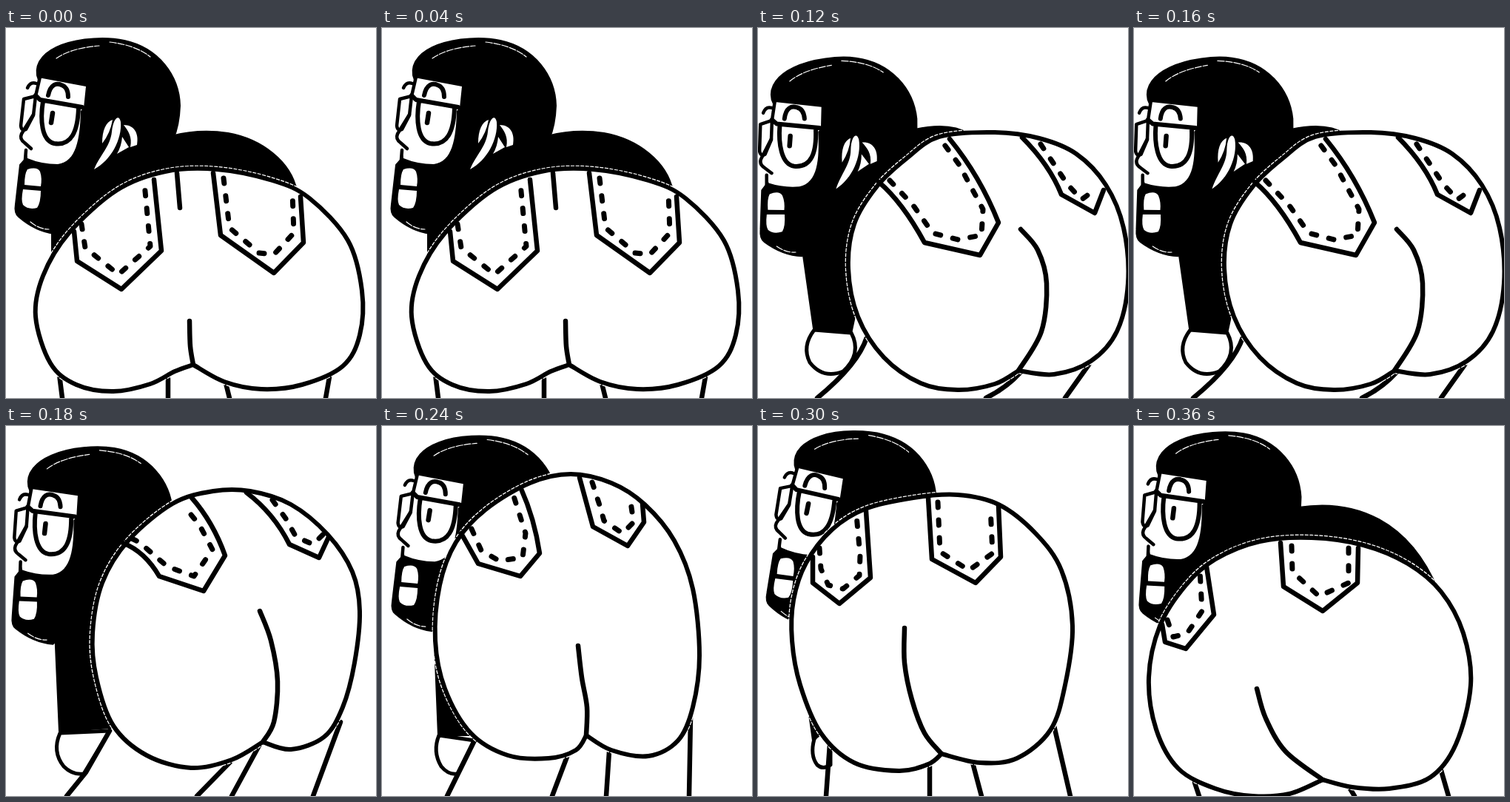
Write an HTML page that moves like this. It is 500 px wide and 500 px high and loops after 420 ms.

```html
<!DOCTYPE html>
<html lang="en">
<head>
<meta charset="utf-8">
<title>Wiggle</title>
<style>
html, body { margin: 0; width: 100%; height: 100%; overflow: hidden; background: #fff; }
svg { display: block; width: 100vw; height: 100vh; }
path { fill: none; stroke: #000; stroke-width: 6; stroke-linecap: round; stroke-linejoin: round; }
.ink { fill: #000; stroke-width: 2; }
.skin { fill: #fff; stroke-width: 5; }
.gap { fill: #fff; stroke: none; }
.thin { stroke-width: 4.5; }
.shine { stroke: #fff; stroke-width: 1.2; stroke-dasharray: 9 2; }
.halo { stroke: #fff; stroke-width: 8.4; stroke-dasharray: 5 1.5; stroke-linecap: butt; }
.body { fill: #fff; }
.line { stroke-width: 6.5; }
.stitch { stroke-width: 7; stroke-dasharray: 7 17; }
.pose { visibility: hidden; animation: show 420ms step-end infinite; }
@keyframes show {
  0% { visibility: visible; }
  14.2857%, 100% { visibility: hidden; }
}
</style>
</head>
<body>
<svg id="stage" viewBox="0 0 500 500">
  <defs>
    <g id="head">
      <path class="ink" d="M42 64C39 45 54 31 75 23C100 13 138 12 160 17C206 27 234 64 235 105Q234 132 226 150L150 205L66 278Q40 275 17 255Q11 250 13 238L19 185L27 176L60 120Z"/>
      <path class="gap" d="M44 67L108 79L105 108L101 112C100 150 95 181 70 184Q48 184 29 176L27 165L33 162L20 149L35 119L40 88Z"/>
      <path class="thin" d="M46 66L40 92M37 117L21 143Q18 150 25 155L34 163M27 165L26 178"/>
      <path class="thin" d="M29 81Q33 72 41 75"/>
      <path d="M57 91C60 76 68 74 75 77Q84 80 84 93"/>
      <path d="M40 91L46 97L103 107M50 99C46 124 48 152 65 156C88 160 97 140 98 108"/>
      <path class="thin" d="M24 96L20 132Q21 140 27 137L37 118L40 92Q32 94 24 96Z"/>
      <path class="line" d="M63 115L61 128"/>
      <path class="gap" d="M29 191Q42 187 46 194Q49 203 47 214L25 212Q25 197 29 191ZM23 218L47 220Q47 236 42 243Q30 246 23 239Q20 233 23 218Z"/>
      <path class="shine" d="M68 41Q88 27 126 24M140 19Q175 23 195 39M33 262Q45 272 58 272"/>
    </g>
    <g id="ear">
      <path class="gap" d="M130 156C130 138 135 127 144 124Q141 142 130 156ZM119 191C128 170 141 160 143 140C145 121 153 116 155 127C157 150 142 179 119 191ZM159 131C173 131 180 142 177 158L168 161C171 147 165 139 159 131ZM157 147L166 161L150 170Q156 160 157 147Z"/>
    </g>
  </defs>
</svg>
<script>
// head: x, y, tilt. body: closed curve starting and ending at the cleft.
const poses = [
  {
    head: [41, 55, 0], ear: true,
    torso: "M62 310V270L140 180L180 163C220 142 260 136 300 142C345 150 385 180 393 220L300 260L100 280Z",
    legs: "M72 468L76 500M219 474V500M297 480L302 500M438 466L432 500",
    body: "253,455 295,478 345,488 400,482 455,457 478,415 481,355 462,287 410,230 360,206 285,191 215,194 150,219 85,277 50,335 40,390 60,453 95,482 145,491 195,481 228,464 253,455",
    cleft: "248,396 249,430 253,455",
    pockets: "M92 275L96 315L156 353L210 301L200 205M280 196L290 280L362 331L402 290L398 228M231 196L235 243",
    stitch: "M102 265L107 297L152 333L195 295L187 210M294 203L302 270L342 304L362 306L389 277L387 222"
  },
  {
    head: [26, 78, -2.4], ear: true,
    torso: "M65 285L76 405H100L200 250L374 188C350 160 300 141 260 143L215 148L150 190Z",
    hand: "M77 406Q62 425 75 437Q92 448 107 440L100 405Z",
    legs: "M107 445L80 500M438 475L415 500",
    body: "330,470 370,487 420,483 465,453 488,380 480,310 455,250 405,205 355,182 300,177 240,187 180,215 130,262 102,318 95,380 107,440 145,495 200,512 260,508 305,491 330,470",
    cleft: "305,282 335,310 354,360 353,420 330,470",
    pockets: "M147 253Q180 258 205 295L269 305L281 250L247 190M318 180Q358 205 378 243L436 283L450 250",
    stitch: "M150 244L168 247L210 281L255 288L264 248L249 208M347 184L373 213L390 239L428 253L440 247"
  },
  {
    head: [17, 88, -4.5], ear: true,
    torso: "M60 300L75 406L126 413L150 300L285 143C265 130 235 132 212 137L150 180Z",
    hand: "M76 408Q59 430 70 452Q88 475 115 464Q141 440 126 412Z",
    legs: "M147 418Q135 455 80 500M355 465Q335 487 308 500M447 455L415 500",
    body: "352,463 400,468 450,450 485,410 500,345 494,270 470,212 430,170 380,149 320,141 245,147 200,177 160,215 130,265 122,325 135,390 170,445 220,480 270,489 320,481 352,463",
    cleft: "355,272 378,300 390,345 383,410 352,463",
    pockets: "M163 208Q195 235 225 290L300 307L325 263Q300 200 259 150M357 148Q394 185 410 225L455 250L467 219",
    stitch: "M178 206L210 240L236 277L270 286L302 280L304 245L272 185L250 155M382 157L402 187L418 211L437 232L456 218"
  },
  {
    head: [29, 73, -2.4],
    torso: "M66 275L72 413L142 408L200 200L200 110L120 140Z",
    hand: "M73 415Q62 440 78 460Q90 472 105 470L140 412Z",
    legs: "M140 412L108 468L82 500M305 452L258 500M342 432L305 500M452 400L415 500",
    body: "347,427 385,437 430,420 455,380 471,320 478,250 468,197 435,147 385,106 330,88 280,88 225,105 165,155 130,212 117,280 122,340 145,405 190,445 250,462 305,451 347,427",
    cleft: "343,250 358,290 367,345 362,400 347,427",
    pockets: "M158 158Q188 170 207 203L267 223L296 175Q280 130 251 97M325 90Q362 118 383 160L423 178L436 150",
    stitch: "M170 152L180 157L218 190L254 203L279 167L261 133L240 108M360 100L378 125L392 150L415 160L430 145"
  },
  {
    head: [43, 54, .3],
    torso: "M70 270L76 418H125L200 250L115 190Z",
    hand: "M77 418Q68 440 80 460Q90 472 102 470L125 425Z",
    legs: "M125 425L88 500M250 447L230 500M307 440L303 500M417 395L415 500",
    body: "276,418 310,438 360,446 400,425 420,380 429,310 420,220 395,155 355,106 310,77 255,65 200,77 140,113 100,157 78,215 72,290 85,355 120,415 170,445 225,449 262,438 276,418",
    cleft: "265,297 270,340 277,380 276,418",
    pockets: "M107 145L130 186L187 203L213 172Q206 125 188 85M267 70L285 136L332 162L354 130L352 105",
    stitch: "M121 139L134 168L158 182L190 178L194 145L178 95M284 76L295 110L300 128L325 145L340 130L336 103"
  },
  {
    head: [49, 44, 2.7],
    torso: "M68 382L74 425H95L100 380Z",
    hand: "M76 423Q70 445 80 458Q88 465 98 458V425Q85 410 76 423Z",
    legs: "M97 430L92 500M232 460V500M290 455L302 500M400 405L422 500",
    body: "248,443 300,455 350,449 395,411 415,350 425,270 410,195 375,145 325,106 270,93 210,97 145,112 100,140 65,185 48,235 46,290 57,350 85,415 130,455 190,466 230,457 248,443",
    cleft: "198,273 198,320 208,370 225,415 248,443",
    pockets: "M74 177V212L110 240L152 205L146 115M230 97L235 180L294 212L328 177L325 108",
    stitch: "M83 165L85 193L95 215L115 220L137 202L138 175L133 120M243 103L246 170L285 195L317 172L314 110"
  },
  {
    head: [30, 52, -1.8],
    torso: "M100 180L130 120L222 110C300 98 372 128 411 222L300 250L50 250Z",
    legs: "M82 482L88 500M290 487L298 500M412 455L425 500",
    body: "255,478 295,488 345,490 400,475 435,430 455,350 445,280 415,224 370,186 310,161 240,151 170,156 110,180 70,215 35,270 20,340 30,410 60,463 110,490 160,500 210,497 255,478",
    cleft: "166,355 178,395 205,440 255,478",
    pockets: "M38 268L42 292L70 301L108 255L98 190M198 158L202 217L255 250L302 212L303 165",
    stitch: "M45 262L53 285L72 280L92 250L89 195M213 162L214 197L250 230L290 212V165"
  }
];

// Smooth curve through a list of points.
function curve(text) {
  const p = text.split(" ").map(s => s.split(",").map(Number));
  const at = i => p[Math.max(0, Math.min(p.length - 1, i))];
  const ease = (a, b, c) => [0, 1].map(k => a[k] + (c[k] - b[k]) / 6);
  let d = "M" + p[0];
  for (let i = 0; i < p.length - 1; i++) {
    d += "C" + [
      ease(at(i), at(i - 1), at(i + 1)),
      ease(at(i + 1), at(i + 2), at(i)),
      at(i + 1)
    ].join(" ");
  }
  return d;
}

const path = (cls, d) => d ? `<path class="${cls}" d="${d}"/>` : "";

function draw(pose, i) {
  const [x, y, tilt] = pose.head;
  const place = `transform="translate(${x} ${y}) rotate(${tilt}) translate(-41 -55)"`;
  const body = curve(pose.body);
  return `<g class="pose" style="animation-delay:${i * 60 - 420}ms">
    <use href="#head" ${place}/>
    ${path("ink", pose.torso)}
    ${pose.ear ? `<use href="#ear" ${place}/>` : ""}
    ${path("skin", pose.hand)}
    ${path("line", pose.legs)}
    ${path("halo", body)}
    ${path("body", body)}
    ${path("line", curve(pose.cleft))}
    ${path("line", pose.pockets)}
    ${path("stitch", pose.stitch)}
  </g>`;
}

document.getElementById("stage").insertAdjacentHTML("beforeend", poses.map(draw).join(""));
</script>
</body>
</html>
```
